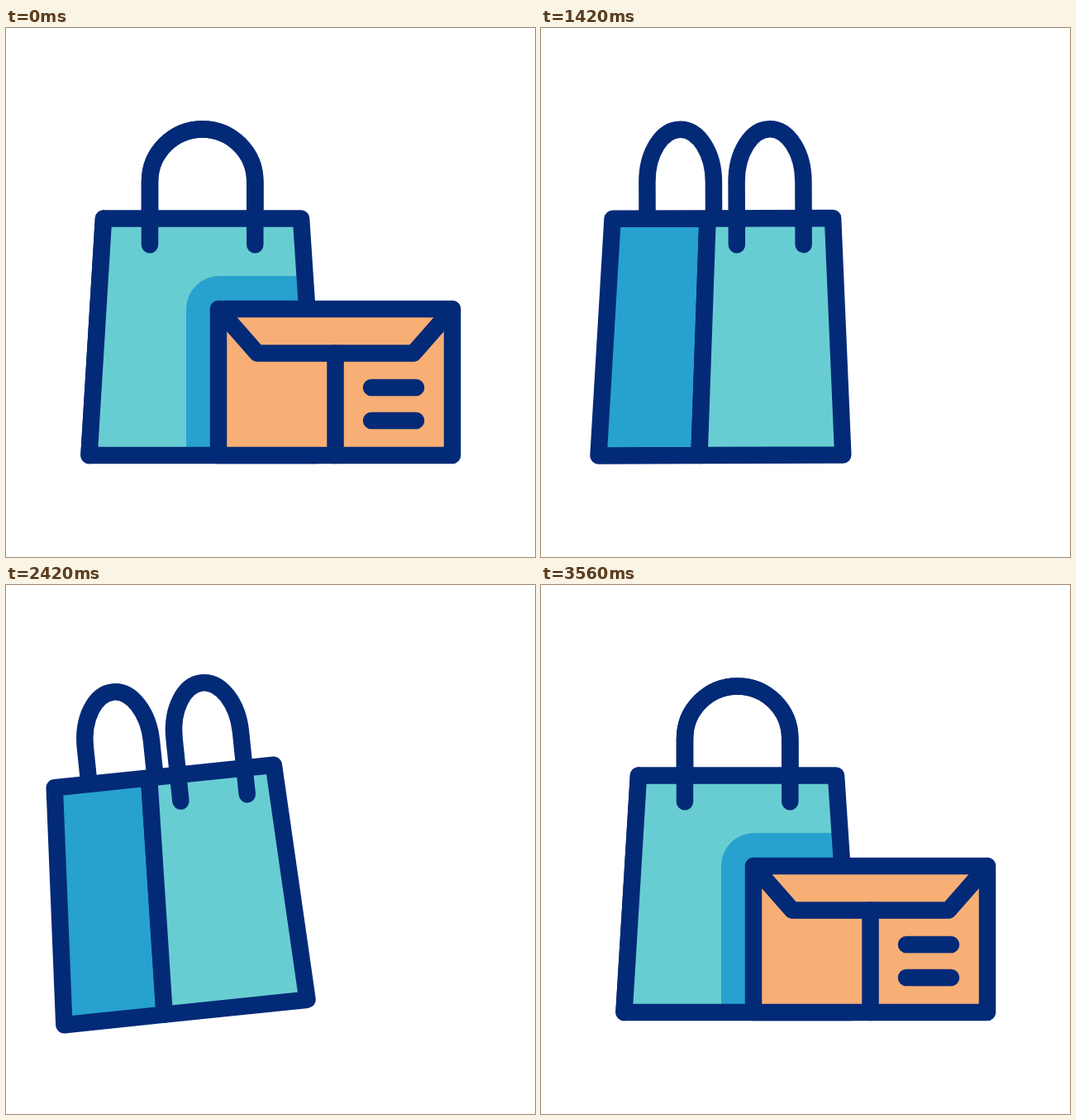
Write an HTML page with a canvas that moves like this. It is 640 px wide and 640 px high and loops after 3600 ms.

```html
<!DOCTYPE html>
<html lang="en">
<head>
<meta charset="utf-8">
<title>Shopping bag and envelope</title>
<style>
  html, body { margin: 0; width: 100%; height: 100%; overflow: hidden; background: #fff; }
  canvas { display: block; width: 640px; height: 640px; }
</style>
</head>
<body>
<canvas id="stage" width="640" height="640"></canvas>
<script>
const ctx = document.getElementById('stage').getContext('2d');
const LOOP = 3600;
const NAVY = '#032a77', TEAL = '#68cdd2', BLUE = '#27a1ce', ORANGE = '#f7af75', YELLOW = '#ffcd50';
const TOP = 230.4, BOTTOM = 517;

const lerp = (a, b, k) => a + (b - a) * k;

function ease(t, from, to) {
  const u = Math.min(1, Math.max(0, (t - from) / (to - from)));
  return u * u * (3 - 2 * u);
}

function bezier(a, b, c, d, u) {
  const v = 1 - u;
  return v * v * v * a + 3 * v * v * u * b + 3 * v * u * u * c + u * u * u * d;
}

function trace(points, closed) {
  ctx.beginPath();
  points.forEach(([x, y]) => ctx.lineTo(x, y));
  if (closed) ctx.closePath();
}

function stroke(color = NAVY) {
  ctx.strokeStyle = color;
  ctx.stroke();
}

function fill(color) {
  ctx.fillStyle = color;
  ctx.fill();
}

// Rocking of the bag in degrees: equal swings of 200 ms each.
function tilt(t) {
  const keys = [0, -6.1, 6.1, -6.1, 6.1, -6.1, 0];
  const step = (t - 1400) / 200;
  if (step <= 0 || step >= keys.length - 1) return 0;
  const i = Math.floor(step);
  return lerp(keys[i], keys[i + 1], ease(step - i, 0, 1));
}

function envelopePose(t) {
  if (t >= 2600) {
    return { x: 398.5 - 577 * (1 - ease(t, 2600, 3560)), y: 428.5, angle: 0, scale: 1 };
  }
  const fly = ease(t, 0, 820), cross = ease(t, 820, 1060), drop = ease(t, 1060, 1400);
  return {
    x: lerp(bezier(398.5, 566, 573, 429.3, fly), 217, cross),
    y: lerp(lerp(bezier(428.5, 438, 58, 123.5, fly), 75, cross), 290, drop),
    angle: -149.5 * fly - 30.5 * cross,
    scale: lerp(1, 0.64, ease(t, 0, 400))
  };
}

// Maps local envelope coordinates to the stage so that line weights stay constant.
function placer({ x, y, angle, scale }) {
  const a = angle * Math.PI / 180;
  const c = Math.cos(a) * scale, s = Math.sin(a) * scale;
  return ([px, py]) => [x + px * c - py * s, y + px * s + py * c];
}

function drawEnvelope(pose) {
  const place = placer(pose);
  const line = points => { trace(points.map(place)); stroke(); };
  trace([[-141.5, -88.5], [141.5, -88.5], [141.5, 88.5], [-141.5, 88.5]].map(place), true);
  fill(ORANGE);
  stroke();
  line([[-141.5, -88.5], [-94.5, -35], [94.5, -35], [141.5, -88.5]]);
  line([[0, -35], [0, 88.5]]);
  line([[43.5, 6.5], [97.5, 6.5]]);
  line([[43.5, 46.5], [97.5, 46.5]]);
}

function drawShadow(pose, face) {
  ctx.save();
  trace(face, true);
  ctx.clip();
  ctx.translate(pose.x, pose.y);
  ctx.rotate(pose.angle * Math.PI / 180);
  ctx.scale(pose.scale, pose.scale);
  ctx.beginPath();
  ctx.roundRect(-180.5, -128.5, 361, 257, 40);
  fill(BLUE);
  ctx.restore();
}

function drawHandle(left, right, base, sway) {
  const mid = (left + right) / 2, rx = (right - left) / 2, ry = 63.5, k = 0.5523;
  const shoulder = 186, peak = shoulder - ry;
  const lean = (x, y) => [x - sway * (12 + (shoulder - y) * 0.17), y];
  ctx.beginPath();
  ctx.moveTo(left, base);
  ctx.lineTo(...lean(left, shoulder));
  ctx.bezierCurveTo(...lean(left, shoulder - ry * k), ...lean(mid - rx * k, peak), ...lean(mid, peak));
  ctx.bezierCurveTo(...lean(mid + rx * k, peak), ...lean(right, shoulder - ry * k), ...lean(right, shoulder));
  ctx.lineTo(right, base);
  stroke();
}

function drawBody(turn, pose, shaded) {
  const topLeft = lerp(118, 202.5, turn), bottomLeft = lerp(100.5, 191.5, turn);
  const face = [
    [topLeft, TOP], [lerp(357, 354, turn), TOP],
    [lerp(376, 365.3, turn), BOTTOM], [bottomLeft, BOTTOM]
  ];
  trace([[lerp(118, 87.5, turn), TOP], [topLeft, TOP], [bottomLeft, BOTTOM],
         [lerp(100.5, 69.5, turn), BOTTOM]], true);
  fill(BLUE);
  stroke();
  trace(face, true);
  fill(TEAL);
  if (shaded) drawShadow(pose, face);
  trace(face, true);
  stroke();
}

function drawStreak(t, left, y, bend) {
  const from = ease(t, 180, 436), to = ease(t, 40, 260);
  if (to <= from) return;
  const points = [];
  for (let i = 0; i <= 20; i++) {
    const x = lerp(left, 184, lerp(from, to, i / 20));
    points.push([x, y - bend * (184 - x) ** 2]);
  }
  trace(points);
  stroke(YELLOW);
}

function draw(t) {
  const turn = ease(t, 0, 400) - ease(t, 2600, 3000);
  const sway = ease(t, 0, 300) - ease(t, 330, 600);
  const pose = envelopePose(t);
  const inFront = t < 600 || t >= 2600;

  ctx.fillStyle = '#fff';
  ctx.fillRect(0, 0, 640, 640);
  ctx.lineWidth = 20.5;
  ctx.lineCap = ctx.lineJoin = 'round';

  ctx.save();
  ctx.translate(217, 516.5);
  ctx.rotate(tilt(t) * Math.PI / 180);
  ctx.translate(-217, -516.5);
  drawHandle(lerp(174, 129.5, turn), lerp(301.3, 210, turn), TOP, sway);
  if (t >= 600 && t < 1400) drawEnvelope(pose);
  drawBody(turn, pose, inFront);
  drawHandle(lerp(174, 237.7, turn), lerp(301.3, 318.5, turn), 262.3, sway);
  ctx.restore();

  if (inFront) drawEnvelope(pose);
  if (t < 436) {
    drawStreak(t, 36, 305.5, 0.0026);
    drawStreak(t, 46, 348.5, 0.0018);
  }
}

const start = performance.now();
function tick() {
  draw((performance.now() - start) % LOOP);
  requestAnimationFrame(tick);
}
tick();
</script>
</body>
</html>
```
